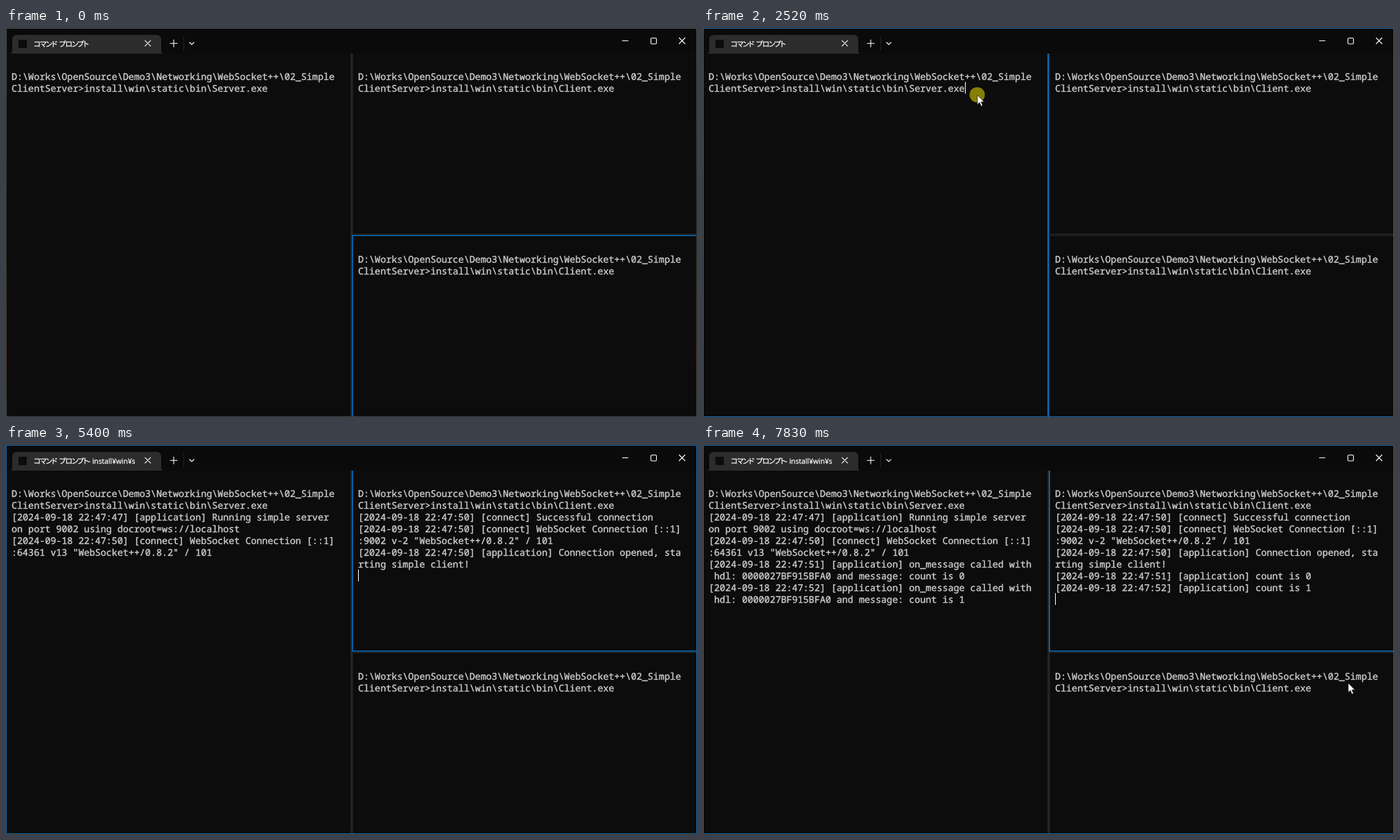
An HTML page for the animation above (8000 ms loop, 997 px wide and 562 px high).

```html
<!DOCTYPE html>
<html lang="ja">
<head>
<meta charset="utf-8">
<title>Terminal</title>
<style>
  html, body { margin: 0; width: 100%; height: 100%; overflow: hidden; background: #0c0c0c; }
  svg { display: block; width: 997px; height: 562px; }
  text { white-space: pre; text-rendering: geometricPrecision; }
  #rows { font: 500 13.4px "Noto Sans Mono", "DejaVu Sans Mono", monospace; fill: #ccc; stroke: #ccc; stroke-width: .4; }
  #title { fill: #fff; stroke: #fff; stroke-width: .25; }
  .kana { font: 500 10.5px "Noto Sans CJK JP", "Noto Sans CJK", sans-serif; font-feature-settings: "palt"; letter-spacing: -1px; }
  .latin { font: 500 10.3px "Open Sans", "Noto Sans", sans-serif; }
  .icon { fill: none; stroke: #fff; stroke-width: 1.1; }
  .pane { fill: #232323; }
  .pane.focus { fill: #0a6ebd; }
</style>
</head>
<body>
<svg viewBox="0 0 997 562">
  <defs>
    <linearGradient id="desk" x2="0" y2="1">
      <stop offset="0" stop-color="#4c4c4c"/>
      <stop offset=".5" stop-color="#33322f"/>
      <stop offset=".85" stop-color="#4a3f2c"/>
      <stop offset="1" stop-color="#444"/>
    </linearGradient>
    <clipPath id="tabClip"><rect x="38" y="10" width="149" height="27"/></clipPath>
  </defs>
  <rect width="997" height="562" fill="#0c0c0c"/>
  <rect width="997" height="37" fill="#0a0a0a"/>

  <path fill="#2c2c2c" d="M5 37q4 0 4-4V17q0-7 7-7H217q7 0 7 7V33q0 4 4 4z"/>
  <rect x="18" y="17" width="12" height="12" fill="#0c0c0c"/>
  <g id="title" clip-path="url(#tabClip)">
    <text class="kana" x="40" y="26.5">コマンド</text>
    <text class="kana" x="77" y="26.5">プロンプト</text>
    <text class="latin" id="command" x="118.5" y="26.5">- install¥win¥server</text>
  </g>
  <path class="icon" d="M200.3 17.8l8.6 8.6m0-8.6l-8.6 8.6M264.5 20.5l3.5 3.5 3.5-3.5M889 18.5h9M971 14l9 9m0-9l-9 9"/>
  <path class="icon" d="M236.5 22.2h11M242 16.7v11"/>
  <rect class="icon" x="930.5" y="14.5" width="8" height="8.5" rx="1.5"/>
  <path stroke="#242424" d="M256.5 12v21"/>

  <path class="pane" d="M497 37h2v525h-2z"/>
  <path class="pane" d="M499 37h1.7v260H997v1.6H499z"/>
  <path class="pane" d="M499 299H997v1.6H500.7V562H499z"/>

  <g id="rows"></g>
  <g id="carets" fill="#fff"></g>
  <rect id="frame" x=".5" y=".5" width="996" height="561" fill="none"/>
  <g id="mouse">
    <circle id="click" cx="-.4" cy="-.6" r="11" fill="#fff000" fill-opacity=".5"/>
    <path fill="#fff" stroke="#000" stroke-width=".6" d="M0 0V13.4L3.1 10.6 5.3 16 7.5 15.1 5.3 9.8H9.6z"/>
  </g>
</svg>
<script>
const LOOP = 8000, LINE = 17;
const $ = id => document.getElementById(id);
const timed = [];

// Shows an element only within the given [from, to) spans.
function during(el, ...spans) { timed.push({ el, spans }); }
const within = (t, spans) => spans.some(([a, b]) => t >= a && t < b);

function make(parent, tag, attrs) {
  const el = document.createElementNS("http://www.w3.org/2000/svg", tag);
  for (const k in attrs) el.setAttribute(k, attrs[k]);
  return parent.appendChild(el);
}

// Prints lines one below another; each block is [start time, ...lines].
function printPane(x, top, blocks) {
  let y = top + 13.5;
  for (const [from, ...lines] of blocks)
    for (const line of lines) {
      const el = make($("rows"), "text", { x, y });
      el.textContent = line;
      during(el, [from, LOOP]);
      y += LINE;
    }
}

const prompt = exe => [0,
  "D:\\Works\\OpenSource\\Demo3\\Networking\\WebSocket++\\02_Simple",
  `ClientServer>install\\win\\static\\bin\\${exe}.exe`];
const stamp = (sec, tag) => `[2024-09-18 22:47:${sec}] [${tag}] `;
const received = (sec, n) => [
  stamp(sec, "application") + "on_message called with",
  ` hdl: 0000027BF915BFA0 and message: count is ${n}`];
const sent = (sec, n) => stamp(sec, "application") + `count is ${n}`;

printPane(8, 61, [
  prompt("Server"),
  [3010, stamp(47, "application") + "Running simple server", "on port 9002 using docroot=ws://localhost"],
  [5400, stamp(50, "connect") + "WebSocket Connection [::1]", ':64361 v13 "WebSocket++/0.8.2" / 101'],
  [6120, ...received(51, 0)],
  [7110, ...received(52, 1)]
]);
printPane(508, 61, [
  prompt("Client"),
  [5400, stamp(50, "connect") + "Successful connection",
    stamp(50, "connect") + "WebSocket Connection [::1]", ':9002 v-2 "WebSocket++/0.8.2" / 101',
    stamp(50, "application") + "Connection opened, sta", "rting simple client!"],
  [6120, sent(51, 0)],
  [7110, sent(52, 1)]
]);
printPane(508, 325, [prompt("Client")]);

function caret(x, y, ...spans) {
  during(make($("carets"), "rect", { x, y, width: 1, height: LINE }), ...spans);
}
caret(878, 342, [1790, 2300]);
caret(378, 78, [2520, 3010]);
caret(8, 129, [3010, 3700], [4230, 4930]);
caret(878, 78, [4930, 5400]);
caret(508, 180, [5400, 6120]);
caret(508, 197, [6120, 6220], [6710, 7110]);
caret(508, 214, [7110, 7310], [7720, LOOP]);

during($("command"), [3110, 4930], [5400, LOOP]);
during($("click"), [1600, 1790], [2520, 2610], [4930, 5030]);

// Pointer stops as [time, x, y]; a bare [time] hides it.
const stops = [
  [0],
  [1080, 452, 2], [1180, 440, 8], [1270, 424, 18], [1370, 409, 28], [1460, 401, 34],
  [1980, 399, 62], [2110, 396, 97], [3010],
  [4420, 420, 92], [4520, 530, 80], [4620, 670, 68], [4720, 770, 61], [4830, 800, 59], [5400],
  [6220, 799, 59], [6320, 796, 130], [6430, 792, 188], [6520, 792, 199],
  [7110, 800, 208], [7210, 830, 236], [7310, 872, 276], [7420, 915, 316],
  [7520, 942, 337], [7620, 948, 343], [7720, 938, 344], [7830, 931, 344]
];
const panes = document.querySelectorAll(".pane");

function draw() {
  const t = performance.now() % LOOP;
  for (const { el, spans } of timed) el.style.display = within(t, spans) ? "" : "none";

  const [, x, y] = stops.findLast(s => s[0] <= t);
  $("mouse").style.display = x === undefined ? "none" : "";
  if (x !== undefined) $("mouse").setAttribute("transform", `translate(${x} ${y})`);

  const focus = t < 2520 ? 2 : t < 4930 ? 0 : 1;
  panes.forEach((p, i) => p.classList.toggle("focus", i === focus));
  $("frame").setAttribute("stroke", t < 1600 ? "url(#desk)" : "#1566a8");
  requestAnimationFrame(draw);
}
draw();
</script>
</body>
</html>
```
